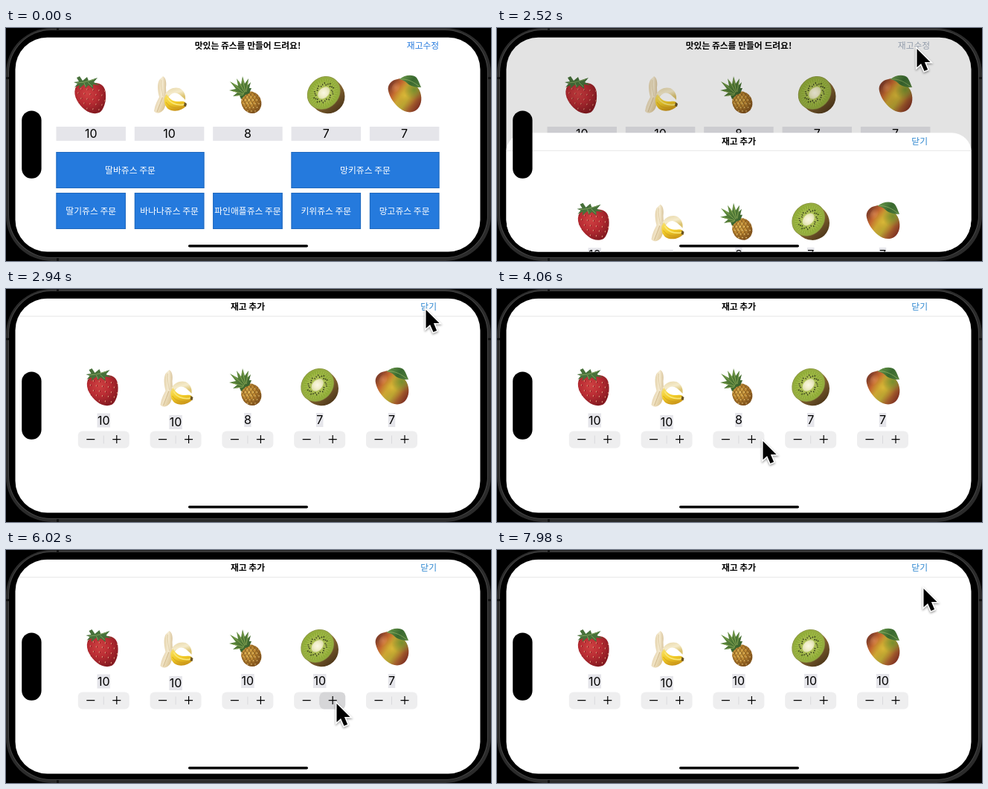
Write an HTML page with a canvas that moves like this. It is 652 px wide and 314 px high and loops after 8 s.

```html
<!DOCTYPE html>
<html lang="ko">
<head>
<meta charset="utf-8">
<title>쥬스 메이커</title>
<style>
  html, body { margin: 0; width: 100%; height: 100%; overflow: hidden; background: #000; }
  canvas { display: block; }
</style>
</head>
<body>
<canvas id="stage" width="652" height="314"></canvas>
<script>
const canvas = document.getElementById('stage');
const ctx = canvas.getContext('2d');
const ratio = window.devicePixelRatio || 1;
canvas.width = 652 * ratio;
canvas.height = 314 * ratio;
canvas.style.width = '652px';
canvas.style.height = '314px';

const LOOP = 8000, STEP = 70, FADE = 140;
const KOREAN = '"Noto Sans CJK KR", "Noto Sans CJK", sans-serif';
const DIGITS = 'Inter, Roboto, sans-serif';
const BLUE = '#257add', GREY = '#e5e5ea';

const clamp = (v) => Math.min(1, Math.max(0, v));
const smooth = (v) => v * v * (3 - 2 * v);

function rect(x, y, w, h, r, fill) {
  ctx.beginPath();
  ctx.roundRect(x, y, w, h, r);
  ctx.fillStyle = fill;
  ctx.fill();
}

function label(str, x, y, color, weight = 400, size = 11.8, family = KOREAN) {
  ctx.font = `${weight} ${size}px ${family}`;
  ctx.textAlign = 'center';
  ctx.fillStyle = color;
  ctx.fillText(str, x, y);
}

const number = (n, x, y) => label(String(n), x, y + 5.8, '#000', 400, 16, DIGITS);

function shape(path, fill) {
  ctx.fillStyle = fill;
  ctx.fill(new Path2D(path));
}

function line(path, color, width) {
  ctx.strokeStyle = color;
  ctx.lineWidth = width;
  ctx.stroke(new Path2D(path));
}

function oval(x, y, rx, ry, turn, fill) {
  ctx.beginPath();
  ctx.ellipse(x, y, rx, ry, turn, 0, 7);
  ctx.fillStyle = fill;
  ctx.fill();
}

function blend(x0, y0, x1, y1, ...colors) {
  const g = ctx.createLinearGradient(x0, y0, x1, y1);
  colors.forEach((c, i) => g.addColorStop(i / (colors.length - 1), c));
  return g;
}

function glow(x, y, r, ...colors) {
  const g = ctx.createRadialGradient(x, y, 0, x, y, r);
  colors.forEach((c, i) => g.addColorStop(i / (colors.length - 1), c));
  return g;
}

// Fruits are drawn around their own centre, about 50 px tall.
function strawberry() {
  const body = 'M-20-8C-23 1-16 13-7 20C-1 25 8 27 14 23C20 18 23 3 20-7C17-17 6-17-2-15C-10-17-18-15-20-8Z';
  shape(body, glow(-4, -2, 28, '#cf4142', '#b92c33', '#851a21'));
  ctx.save();
  ctx.clip(new Path2D(body));
  for (let row = 0; row < 6; row++) {
    for (let col = 0; col < 6; col++) {
      const x = -20 + col * 8 + (row % 2) * 4, y = -9 + row * 6.5 + col * 0.8;
      oval(x, y, 0.7, 1.1, 0.2, '#e0977a');
      oval(x + 0.9, y + 0.4, 0.5, 1.1, 0.2, '#7d161c');
    }
  }
  ctx.restore();
  shape('M-22-17L-15-18L-18-23L-14-25L-10-19L-4-24L-2-19L10-23L5-17L13-13L4-14L4-8L-2-13L-6-9L-8-14L-15-8L-14-13L-21-10L-17-15Z', '#47713a');
  line('M-18-16L-8-17L6-21M-8-16L-6-11M-3-17L3-11', '#86a863', 0.9);
}

function banana() {
  shape('M-11-2C-16 6-20 14-21 22C-17 27-10 24-7 18C-4 11-3 4-4-3Z', blend(-20, 0, -3, 6, '#d9c39c', '#f1e4c6', '#dcc594'));
  line('M-9 2C-12 9-14 16-17 23', '#cbb283', 0.8);
  shape('M-9-25C-5-23-4-16-5-10C-5-5-4 0-5 4L-14 3C-16-5-17-14-14-20Z', blend(-16, 0, -4, 0, '#e5d3ac', '#f6ecd2', '#d5bf95'));
  line('M-11-20C-12-12-10-5-9 2', '#dccaa1', 0.8);
  shape('M-6-1C-2-8 6-11 13-9C19-6 22 0 21 7C18 4 15 0 10-2C5-4 1-1-3 5Z', blend(4, -10, 8, 5, '#eadbb0', '#f5ebcb', '#dcc36f'));
  shape('M-4-1C-1 5 4 9 10 9C15 9 18 8 21 10L22 15C18 20 10 23 2 21C-5 19-8 12-7 4Z', blend(2, 0, 7, 22, '#f7dd62', '#f2cc28', '#c99317'));
  line('M-3 4C0 11 9 15 20 13', '#fae672', 1.8);
  line('M-5 10C0 18 11 20 20 15', '#cf9d1d', 0.8);
  shape('M20 10L23 12L22 16L19 15Z', '#6a5424');
}

function pineapple() {
  const body = new Path2D();
  body.ellipse(4.8, 10.3, 13.2, 15, -0.45, 0, 7);
  ctx.fillStyle = glow(1, 7, 18, '#ddb04e', '#bf8932', '#7c4c1b');
  ctx.fill(body);
  ctx.save();
  ctx.clip(body);
  for (let i = -30; i < 40; i += 5) {
    line(`M${i - 16}-12Q${i} 3 ${i + 10} 30`, '#80581f', 0.9);
    line(`M${i + 16}-12Q${i + 6} 8 ${i - 14} 28`, '#8c6022', 0.9);
    for (let y = -8; y < 28; y += 5) oval(i + (y % 2) * 2.5, y, 0.8, 0.8, 0, '#ecce7d');
  }
  ctx.restore();
  shape('M-9 6L-11 1L-20 2L-14-3L-25-6L-16-8L-24-18L-13-12L-15-22L-9-14L-7-25L-4-15L1-22L0-13L4-17L2-9L5-9L2-2L-3 0Z', blend(-18, -20, 2, 0, '#66913f', '#355e2c'));
  line('M-5-2L-19-15M-4-3L-12-18M-3-4L-7-21M-2-4L0-18M-5-1L-20-5M-6 0L-16 1', '#91ad59', 0.9);
}

function kiwi() {
  oval(1, 1.2, 24.5, 23.5, 0.8, blend(-10, -15, 20, 20, '#9b8145', '#80602f', '#4b3519'));
  ctx.save();
  ctx.translate(-3.3, -2.6);
  ctx.rotate(-0.8);
  oval(0, 0, 24, 20.8, 0, '#87923d');
  oval(0, 0, 23.2, 20, 0, glow(0, 0, 24, '#d6dc9a', '#a9bd4e', '#8eac35', '#9aae46'));
  for (let i = 0; i < 34; i++) {
    const c = Math.cos(i * Math.PI / 17), s = Math.sin(i * Math.PI / 17);
    line(`M${9 * c} ${6.5 * s}L${20 * c} ${17 * s}`, 'rgba(214,222,138,.4)', 0.7);
  }
  oval(0, 0, 9.5, 6.5, 0, glow(0, 0, 10, '#faf7e3', '#f0edc8', '#d4daa0'));
  for (let i = 0; i < 30; i++) {
    const a = i * Math.PI / 15, r = 1 + (i * 7 % 3) * 0.13;
    oval(12 * r * Math.cos(a), 9 * r * Math.sin(a), 1.2, 0.65, a, '#30351c');
  }
  ctx.restore();
}

function mango() {
  const body = 'M-10-20C-18-19-24-12-22-4C-20 5-14 13-7 19C0 25 9 26 15 22C22 17 24 7 21-2C18-11 11-15 5-18C0-21-5-22-10-20Z';
  shape(body, blend(-20, -10, 20, 17, '#84402a', '#c3662f', '#cba634', '#b5a433', '#a25c2c', '#7d2f22'));
  ctx.save();
  ctx.clip(new Path2D(body));
  oval(0, 2, 18, 18, 0, glow(0, 2, 17, 'rgba(224,190,58,.75)', 'rgba(210,168,45,.3)', 'rgba(210,160,40,0)'));
  oval(13, -6, 14, 14, 0, glow(13, -6, 14, 'rgba(112,139,45,.9)', 'rgba(122,145,47,0)'));
  oval(-12, -9, 5, 8, 0.5, glow(-12, -9, 8, 'rgba(236,160,110,.45)', 'rgba(236,160,110,0)'));
  ctx.restore();
  shape('M-7-20C0-26 11-27 16-22C19-18 20-13 22-9C14-9 7-11 3-15C0-18-4-19-7-20Z', blend(0, -24, 18, -10, '#5d8b43', '#39692f', '#4a7638'));
  line('M-7-20C4-21 13-16 21-9', '#8dae63', 0.8);
}

const fruits = [
  { draw: strawberry, home: [113, 90], sheet: [129.5, 132], stock: 10, numY: 177 },
  { draw: banana, home: [220, 90], sheet: [228.5, 134], stock: 10, numY: 179.5 },
  { draw: pineapple, home: [325, 90], sheet: [325, 132], stock: 8, numY: 176.5 },
  { draw: kiwi, home: [430.5, 90], sheet: [422, 132], stock: 7, numY: 176.5 },
  { draw: mango, home: [536, 89], sheet: [519, 131], stock: 7, numY: 176.5 }
];

// fruit index, press, release
const taps = [
  [2, 4480, 4620], [2, 4690, 4830],
  [3, 5250, 5390], [3, 5460, 5600], [3, 5740, 5960],
  [4, 6580, 6800], [4, 6860, 6940], [4, 7000, 7080]
];

// start, end, x, y
const moves = [
  [770, 1610, 563, 25], [3220, 4060, 356, 202], [4060, 4340, 350, 205],
  [4830, 5040, 423, 203], [5110, 5180, 434, 201], [5180, 5320, 443, 204],
  [6160, 6370, 541, 204], [6440, 6510, 543, 204], [7490, 7980, 572, 49]
];

function put(draw, [x, y]) {
  ctx.save();
  ctx.translate(x, y);
  draw();
  ctx.restore();
}

function order(name, x, y, w) {
  rect(x, y, w, 49, 0, BLUE);
  ctx.strokeStyle = '#2169bd';
  ctx.lineWidth = 1;
  ctx.strokeRect(x + 0.5, y + 0.5, w - 1, 48);
  label(name + '쥬스 주문', x + w / 2, y + 29, '#fff');
}

function home(t) {
  rect(12, 12, 626, 291, 0, '#fff');
  label('맛있는 쥬스를 만들어 드려요!', 325, 28, '#000', 700);
  label('재고수정', 560.5, 28, t < 2310 ? BLUE : t < 2450 ? '#a8caf1' : '#a5b0c0');
  fruits.forEach((f, i) => {
    const x = 67.5 + i * 105.35;
    put(f.draw, f.home);
    rect(x, 133, 93.5, 19, 0, GREY);
    number(f.stock, x + 46.7, 142.6);
  });
  order('딸바', 67.5, 167, 199);
  order('망키', 383.5, 167, 199);
  ['딸기', '바나나', '파인애플', '키위', '망고'].forEach((name, i) => order(name, 67.5 + i * 105.35, 222, 93.5));
}

function stepper(x, press) {
  rect(x - 34.5, 191.5, 69, 23, 6, '#eeeeef');
  rect(x - 0.5, 197.5, 1, 11, 0, '#d9d9dc');
  if (press > 0) {
    ctx.globalAlpha = press;
    rect(x, 191.5, 34.5, 23, 6, '#c5c5c8');
    ctx.globalAlpha = 1;
  }
  line(`M${x - 23} 202.6h11M${x + 12} 202.6h11M${x + 17.5} 197.1v11`, '#000', 1.2);
}

function sheet(t) {
  rect(12, 12.5, 626, 330, [27, 27, 0, 0], '#fff');
  rect(12, 36.2, 626, 1, 0, '#e6e6e6');
  label('재고 추가', 325, 28, '#000', 700);
  label('닫기', 568.2, 28, '#2b85cf');
  fruits.forEach((f, i) => {
    const x = 131.3 + i * 96.8;
    let count = f.stock, press = 0;
    for (const [who, down, up] of taps) {
      if (who !== i || t < down) continue;
      count++;
      press = clamp(1 - (t - up) / FADE);
    }
    const w = count > 9 ? 17.5 : 9.5;
    put(f.draw, f.sheet);
    rect(x - w / 2, f.numY - 9.5, w, 19, 0, GREY);
    number(count, x, f.numY);
    stepper(x, press);
  });
}

function cursor(t) {
  if (t < 840) return;
  let x = 299, y = 251;
  for (const [from, to, nx, ny] of moves) {
    const k = smooth(clamp((t - from) / (to - from)));
    x += (nx - x) * k;
    y += (ny - y) * k;
  }
  ctx.save();
  ctx.translate(x + 1.5, y + 3);
  const arrow = new Path2D('M0 0V25L5.6 20L10 30L14.6 28L10.4 18H18Z');
  ctx.shadowColor = 'rgba(0,0,0,.4)';
  ctx.shadowBlur = 3 * ratio;
  ctx.shadowOffsetY = 1.5 * ratio;
  ctx.strokeStyle = '#fff';
  ctx.lineWidth = 3.2;
  ctx.stroke(arrow);
  ctx.shadowColor = 'transparent';
  ctx.fillStyle = '#000';
  ctx.fill(arrow);
  ctx.restore();
}

function phone() {
  rect(0, 0, 652, 314, 0, '#000');
  rect(0, 0, 652, 314, 61, '#2b2b2b');
  rect(3, 2, 645, 308, 58, '#464646');
  rect(4, 3, 643, 306, 57, '#000');
  for (const x of [0, 648]) rect(x, 66, 4, 3, 0, '#111');
  for (const y of [0, 310]) rect(68, y, 3, 4, 0, '#111');
}

function render(t) {
  ctx.setTransform(ratio, 0, 0, ratio, 0, 0);
  phone();
  ctx.save();
  ctx.beginPath();
  ctx.roundRect(12.5, 12.7, 625, 288.8, 43);
  ctx.clip();

  // Critically damped spring lifts the sheet.
  const s = Math.max(0, t - 2400) * 0.0155;
  const rest = t >= 2940 ? 0 : (1 + s) * Math.exp(-s);
  if (rest > 0) home(t);
  if (rest < 1) {
    rect(12, 12, 626, 291, 0, `rgba(0,0,0,${0.2 * (1 - rest)})`);
    ctx.translate(0, 289 * rest);
    sheet(t);
    if (rest === 0) rect(12, 12, 626, 24, 0, 'rgba(255,255,255,0)');
  }
  ctx.restore();

  rect(21.2, 111.4, 26.4, 91.4, 13.2, '#000');
  rect(245, 292, 161, 3.6, 1.8, '#000');
  cursor(t);
}

// The screen refreshes in even steps.
const start = performance.now();
function tick() {
  const t = (performance.now() - start) % LOOP;
  render(Math.floor(t / STEP) * STEP);
  requestAnimationFrame(tick);
}
tick();
</script>
</body>
</html>
```
